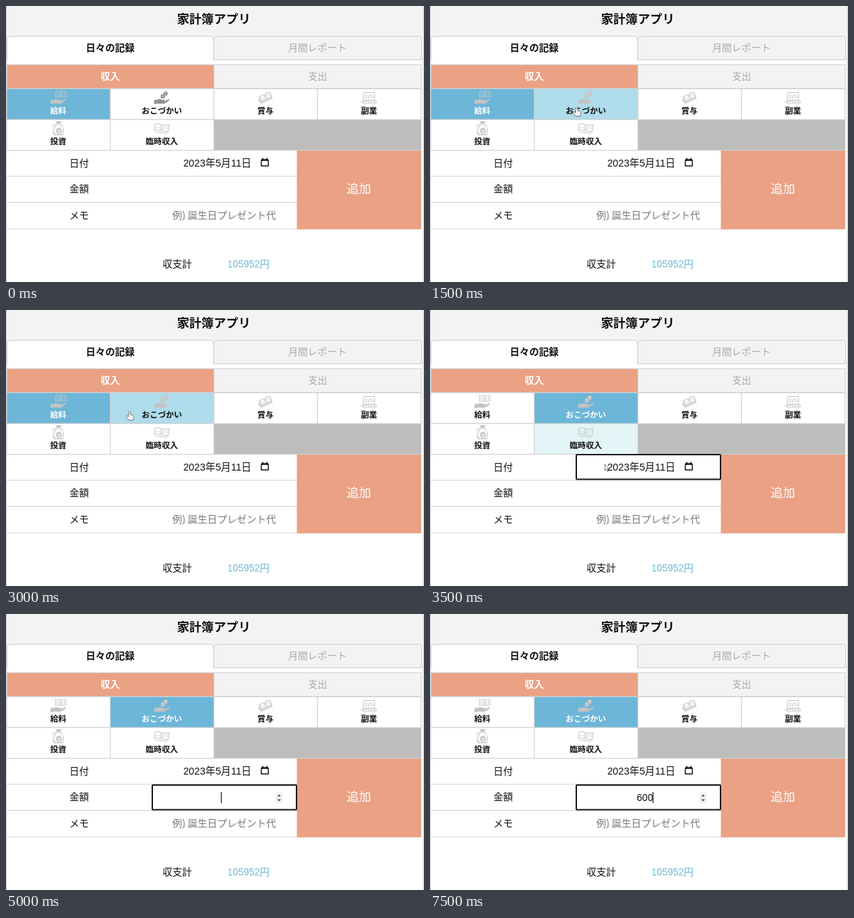
Recreate the animation shown at these times as an HTML page. Size 600 by 397 pixels, loop 8000 ms.

```html
<!DOCTYPE html>
<html lang="ja">
<head>
<meta charset="utf-8">
<style>
  html, body { margin: 0; width: 100%; height: 100%; overflow: hidden; background: #fff; }
  svg { display: block; width: 600px; height: 397px; }
  text { font-family: "Noto Sans CJK JP", "Noto Sans CJK", sans-serif; text-anchor: middle; }
  .latin { font-family: "Liberation Sans", "Noto Sans CJK JP", "Noto Sans CJK", sans-serif; }
  .icon { fill: none; stroke: #c6c6c6; stroke-width: 1.1; stroke-linejoin: round; stroke-linecap: round; }
  .icon .solid { fill: #c2c2c2; stroke: none; }
  .icon.dark { stroke: #919191; }
  .icon.dark .solid { fill: #919191; }
</style>
</head>
<body>
<svg id="stage" viewBox="0 0 600 397"></svg>
<script>
const LOOP = 8000, STEP = 500;
const SALMON = '#eaa184', BLUE = '#6cb6d8', HOVER = '#afdceb', PALE = '#e4f5f7', LINE = '#cfcfcf';
const stage = document.getElementById('stage');

const rect = (x, y, w, h, fill, extra = '') =>
  `<rect x="${x}" y="${y}" width="${w}" height="${h}" fill="${fill}" ${extra}/>`;
const path = (d, extra = '') => `<path d="${d}" ${extra}/>`;
// Text centred on the point (x, cy)
const label = (x, cy, size, str, fill = '#111', extra = '') =>
  `<text x="${x}" y="${cy + size * 0.38}" font-size="${size}" fill="${fill}" ${extra}>${str}</text>`;
const bold = 'font-weight="700"';
const latin = 'class="latin"';

const hand = path('M-11 3h3v6h-3zM-8 4q3-3 6-2l2 1h4q1.500 1-.5 2h-4h5l5-3q2.500 0 1 2l-6 4q-1 .5-3 .5h-9.500z', 'class="solid"');
const note = (x, y, w, h) => `<rect x="${x}" y="${y}" width="${w}" height="${h}"/>` +
  `<circle cx="${x + w / 2}" cy="${y + h / 2}" r="${h / 4}"/>` +
  path(`M${x + 2.5} ${y + 2.5}v${h - 5}M${x + w - 2.5} ${y + 2.5}v${h - 5}`);

const icons = {
  salary: note(-4, -9, 15, 8) + hand,
  coins: '<circle class="solid" cx="1.500" cy="-2" r="3.200"/><circle class="solid" cx="5.500" cy="-6" r="3"/>' +
    path('M1.500-3.500v3M5.500-7.500v3', 'stroke="#eee" stroke-width=".8"') + hand,
  bonus: `<g transform="translate(0 -1.500) rotate(-24)">${note(-8.5, -3.5, 17, 7)}</g>` +
    path('M-9.500 2l4 4 15-7M-9.500 4l4 4 15-7'),
  laptop: path('M-8-7.500h16v11h-16zM-10.500 5h21q0 2.500-2 2.500h-17q-2 0-2-2.500z') +
    path('M-3-4l-2 2 2 2M3-4l2 2-2 2M1-4.500l-2 5'),
  bag: path('M-4-11l2 4h5l2-4-3 1-2-1-2 1z', 'class="solid"') +
    path('M-2-6q-7 6-4 14h12q4-8-3-14z') + '<circle class="solid" cx="1" cy="3" r="4"/>' +
    path('M-1 1l2 2 2-2M1 3v3M-1 4h4', 'stroke="#fff" stroke-width=".9"') +
    path('M-8-6h4M-8-3h3M-6 9h13'),
  cash: path('M-10.500-6q5-2 10 0t10.500 0v9q-5 2-10 0t-10.500 0z') +
    '<circle cx="0" cy="-1.500" r="2.500"/>' + path('M-7.500-3v3M7.500-3v3M-8 5.500q4-1 8 .5t8-.5')
};

const cells = [
  { name: '給料', icon: 'salary', col: 0, row: 0 },
  { name: 'おこづかい', icon: 'coins', col: 1, row: 0 },
  { name: '賞与', icon: 'bonus', col: 2, row: 0 },
  { name: '副業', icon: 'laptop', col: 3, row: 0 },
  { name: '投資', icon: 'bag', col: 0, row: 1 },
  { name: '臨時収入', icon: 'cash', col: 1, row: 1 }
];

function cellMarkup({ name, icon, col, row }, fill, white, dark) {
  const x = 1 + col * 148.7, y = 119 + row * 44.3, cx = x + 74;
  return rect(x, y, 148.7, 44.3, fill, `stroke="${LINE}"`) +
    `<g class="icon${dark ? ' dark' : ''}" transform="translate(${cx} ${y + 13})">${icons[icon]}</g>` +
    label(cx, y + 31.2, 11.6, name, white ? '#fff' : '#111', bold);
}

const backdrop =
  rect(0, 0, 600, 397, '#fff') +
  rect(0, 0, 600, 78, '#f3f3f3') + rect(597, 0, 3, 397, '#f3f3f3') +
  path('M.5 0V397M599.5 0V397', `stroke="${LINE}"`) +
  label(298.2, 18.7, 17.6, '家計簿アプリ', '#111', bold) +
  path('M298.5 77.5V49q0-5.5 5.5-5.5H591q5.5 0 5.5 5.5V77.5z', `fill="#f3f3f3" stroke="${LINE}"`) +
  path('M1.5 78V49q0-5.5 5.5-5.5H292.5q5.5 0 5.5 5.5V78', `fill="#fff" stroke="${LINE}"`) +
  label(149.5, 59.7, 14, '日々の記録', '#111', bold) +
  label(447, 59.7, 14, '月間レポート', '#aaa') +
  rect(298.5, 84.5, 297.5, 34, '#f3f3f3', `stroke="${LINE}"`) +
  rect(1.5, 84.5, 297, 34, SALMON, `stroke="${LINE}"`) +
  label(149.5, 101, 13.7, '収入', '#fff', bold) +
  label(447.5, 101, 13.7, '支出', '#aaa') +
  rect(298, 163, 298, 44.5, '#bdbdbd');

const form =
  path('M1 207.5H596M1 245H418M1 282.5H418M1 321H596', `stroke="${LINE}"`) +
  ['日付', '金額', 'メモ'].map((s, i) => label(105, 225.3 + i * 37.8, 14, s)).join('') +
  label(303.3, 225.5, 14.35, '2023年5月11日', '#111', latin) +
  path('M366.5 222h10v8h-10zM366.5 221h10M368.5 218.5v2M374.5 218.5v2', 'fill="none" stroke="#111" stroke-width="1.5"') +
  label(313.3, 300.8, 14.1, '例) 誕生日プレゼント代', '#777') +
  rect(417.5, 208, 178.5, 113, SALMON) +
  label(506.5, 262.2, 17.5, '追加', '#fff') +
  label(245.7, 370.3, 14, '収支計') +
  label(348, 371, 14, '105952円', '#72b5d3', latin);

const focusRing = y => rect(210, y, 207, 35.5, 'none', 'stroke="#1a1a1a" stroke-width="2" rx="1"');
const spinner = rect(387, 257, 10, 15, '#efefef') +
  path('M392 259.5l2.5 3h-5zM392 269.5l2.5-3h-5z', 'fill="#555"');
const caret = x => rect(x, 256, 1.2, 16, '#111');
const pointer = (x, y) => path(
  'M-2-6q1.5-1.5 2.5 0v4l4 1q1.5.5 1 3l-1 4h-6l-4-5q0-2 2-1l1.5 1z',
  `transform="translate(${x} ${y})" fill="#fff" stroke="#666" stroke-width=".9"`);
const arrow = path('M251 222v9l2-2 1.5 3.5 1.5-1-1.5-3h2.5z', 'fill="#fff" stroke="#555" stroke-width=".8"');

function cellFill(i, t) {
  const selected = t < 3500 ? 0 : 1;
  if (i === selected) return BLUE;
  if (i === 1 && t >= 1500) return HOVER;
  return i === 5 && t >= 3500 && t < 4000 ? PALE : '#fff';
}

function overlay(t) {
  if (t < 1500) return '';
  if (t < 3500) return pointer(211 - 33 * (t - 1500) / 1500, 152.5);
  if (t < 4000) return focusRing(208) + arrow;
  const typed = t >= 7500;
  const caretOn = t >= 5000 && t % 1000 < 500;
  return focusRing(246) + spinner +
    (typed ? label(308.5, 264, 14, '600', '#111', latin) + caret(319.5) : caretOn ? caret(308.5) : '');
}

function draw(t) {
  stage.innerHTML = backdrop +
    cells.map((c, i) => {
      const fill = cellFill(i, t);
      return cellMarkup(c, fill, fill === BLUE, i === 1 && t < 1500);
    }).join('') + form + overlay(t);
}

let start, shown = -1;
function tick(now) {
  start ??= now;
  const t = Math.floor(((now - start) % LOOP) / STEP) * STEP;
  if (t !== shown) draw(shown = t);
  requestAnimationFrame(tick);
}
draw(0);
requestAnimationFrame(tick);
</script>
</body>
</html>
```
